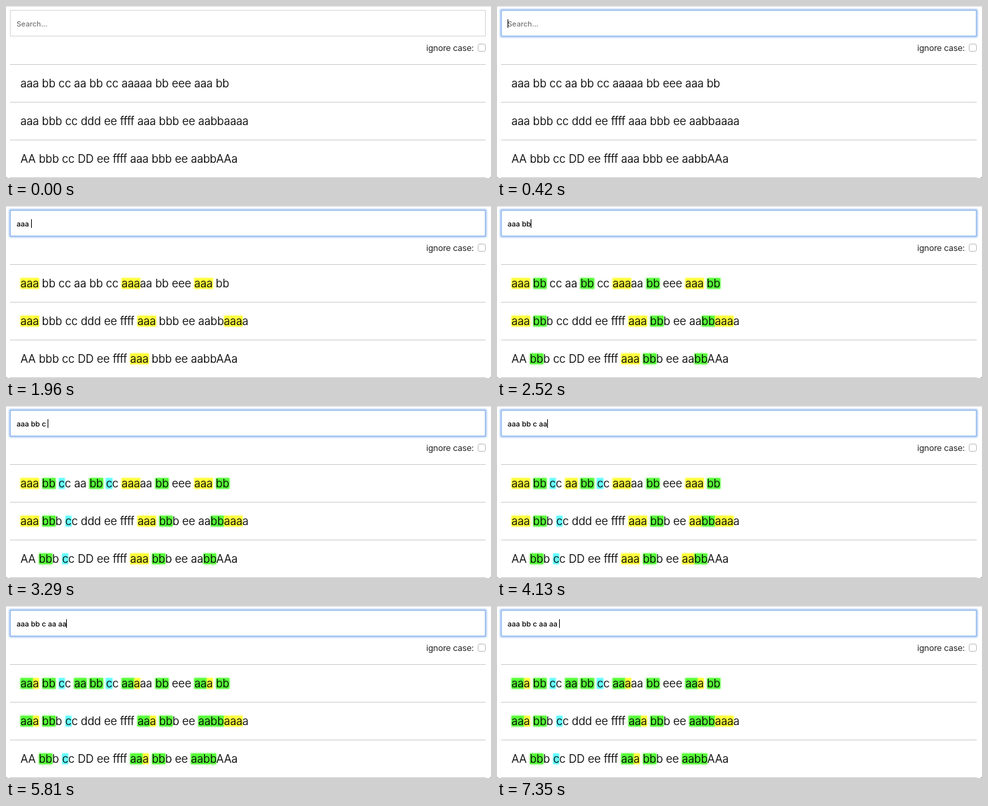
Write an HTML page that moves like this. It is 734 px wide and 260 px high and loops after 7420 ms.

```html
<!DOCTYPE html>
<html lang="en">
<head>
<meta charset="utf-8">
<title>Word highlighter</title>
<style>
html, body { margin: 0; width: 734px; height: 260px; overflow: hidden; background: #777; }
#stage {
  position: relative; width: 734px; height: 260px; box-sizing: border-box;
  background: #fff; border-top: 1px solid #ddd; border-radius: 0 0 3px 3px;
  color: #000; font-family: Inter, "Noto Sans CJK JP", sans-serif; font-weight: 300; overflow: hidden;
}
#stage > * { position: absolute; white-space: pre; box-sizing: border-box; }
#field {
  left: 6px; top: 5px; width: 720px; height: 40px; padding: 0 9px;
  border: 1px solid #d4d4d4; font: 500 11px/40px Inter, sans-serif;
}
#field.empty { color: #757575; }
#field.focus {
  border-color: #8fb6ee;
  box-shadow: 0 0 3px 1px #8ab4ee, inset 0 0 2px #9dc0f0;
}
#caret { top: 19px; width: 1px; height: 13px; background: #000; }
#label { right: 26px; top: 54px; font-size: 12.6px; line-height: 17px; -webkit-text-stroke: .15px; }
#box { left: 714px; top: 56px; width: 12px; height: 12px; border: 1px solid #bbb; border-radius: 3px; }
.row {
  left: 6px; width: 720px; height: 58px; margin: 0; padding-left: 16px; isolation: isolate;
  border: solid #ccc; border-width: 1px 0; font-size: 16.85px; line-height: 57px;
  -webkit-text-stroke: .2px;
}
mark { position: relative; background: none; color: inherit; }
mark::before {
  content: ""; position: absolute; z-index: -1; inset: 2px 0;
  background: var(--c); box-shadow: 0 0 3px var(--c);
}
</style>
</head>
<body>
<div id="stage">
  <div id="field"></div>
  <div id="caret"></div>
  <div id="label">ignore case:</div>
  <div id="box"></div>
</div>
<script>
const LOOP = 7420, FOCUS = 420, BLINK = 490;
const COLORS = ["#ffff3c", "#58ff3a", "#66ffff"];
const QUERY = "aaa bb c aa aa ";
const KEY_TIMES = [1050, 1260, 1400, 1820, 2170, 2310, 2730, 2940, 3220,
                   3780, 4060, 5110, 5390, 5600, 6300];
const LINES = [
  "aaa bb cc aa bb cc aaaaa bb eee aaa bb",
  "aaa bbb cc ddd ee ffff aaa bbb ee aabbaaaa",
  "AA bbb cc DD ee ffff aaa bbb ee aabbAAa"
];

const stage = document.getElementById("stage");
const field = document.getElementById("field");
const caret = document.getElementById("caret");
const rows = LINES.map((_, i) => {
  const row = document.createElement("p");
  row.className = "row";
  row.style.top = 87 + 57 * i + "px";
  return stage.appendChild(row);
});
const ruler = document.createElement("canvas").getContext("2d");

// Each term marks its first hit in a word; later terms paint over earlier ones.
function highlightWord(word, terms) {
  const paint = Array(word.length).fill("");
  terms.forEach((term, i) => {
    const at = word.indexOf(term);
    if (at >= 0) paint.fill(COLORS[i % COLORS.length], at, at + term.length);
  });
  let html = "";
  for (let i = 0, j; i < word.length; i = j) {
    for (j = i + 1; j < word.length && paint[j] === paint[i];) j++;
    const run = word.slice(i, j);
    html += paint[i] ? `<mark style="--c:${paint[i]}">${run}</mark>` : run;
  }
  return html;
}

function showQuery(text) {
  const terms = text.split(" ").filter(Boolean);
  field.textContent = text || "Search...";
  field.classList.toggle("empty", !text);
  rows.forEach((row, i) => {
    row.innerHTML = LINES[i].split(" ").map(w => highlightWord(w, terms)).join(" ");
  });
  ruler.font = "500 11px Inter, sans-serif";
  caret.style.left = Math.round(16 + ruler.measureText(text).width) + "px";
}

let shown = -1;
const start = performance.now();
function draw() {
  const t = (performance.now() - start) % LOOP;
  const typed = KEY_TIMES.filter(k => k <= t).length;
  if (typed !== shown) showQuery(QUERY.slice(0, shown = typed));
  const since = t - (typed ? KEY_TIMES[typed - 1] : FOCUS);
  field.classList.toggle("focus", t >= FOCUS);
  caret.hidden = since < 0 || Math.floor(since / BLINK) % 2 === 1;
  requestAnimationFrame(draw);
}
draw();
</script>
</body>
</html>
```
